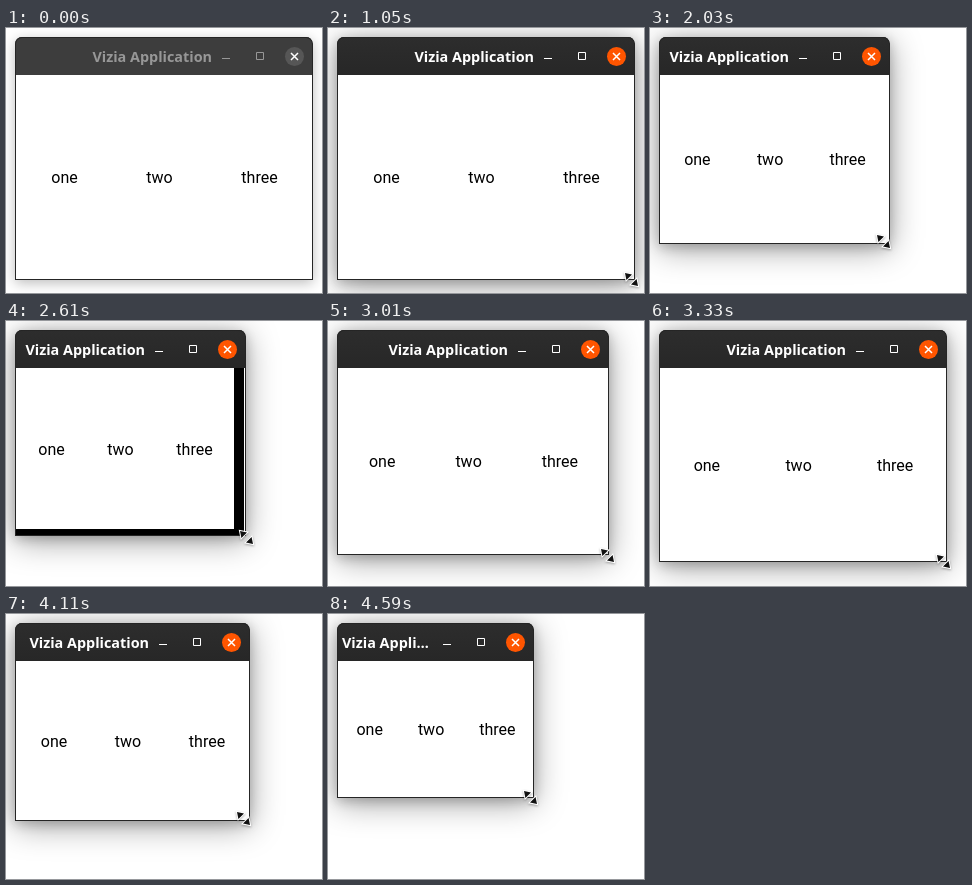
These frames come from a looping animation (316x265 px, 4750 ms). An HTML page:

```html
<!DOCTYPE html>
<html lang="en">
<head>
<meta charset="utf-8">
<title>Resizing a window</title>
<style>
  html, body { margin: 0; width: 100%; height: 100%; overflow: hidden; background: #fff; }
  #win {
    position: absolute; left: 9px; top: 9px; overflow: hidden;
    border-radius: 7px 7px 0 0;
    background: linear-gradient(270deg, #fff 2px, #000 0);
    box-shadow: 0 3px 12px rgba(0, 0, 0, .2), 0 5px 32px rgba(0, 0, 0, .38);
  }
  #win::after {
    content: ""; position: absolute; inset: 0; border-radius: inherit;
    box-shadow: inset 0 0 0 1px #252525;
  }
  #bar {
    position: absolute; inset: 0 0 auto; height: 38px;
    background: linear-gradient(#2d2d2d, #272727); color: #fff;
  }
  #title {
    position: absolute; left: 5px; right: 101px; top: 1px;
    font: 700 14.4px/38px "Noto Sans", "Open Sans", sans-serif;
    text-align: right; white-space: nowrap; overflow: hidden; text-overflow: ellipsis;
  }
  #bar svg { position: absolute; right: 0; top: 0; }
  #bar circle { fill: #ff5500; }
  #body {
    position: absolute; left: 1px; top: 38px; box-sizing: border-box;
    padding: 2px 0 0 1px; background: #fff; color: #000;
    display: flex; justify-content: space-around; align-items: center;
    font: 16px/20px Roboto, sans-serif;
  }
  #win.idle { box-shadow: 0 3px 13px rgba(0, 0, 0, .27); }
  .idle #bar { background: #3d3d3d; color: #979797; }
  .idle #bar circle { fill: #565656; }
  .cursor {
    position: absolute; left: 0; top: 0; overflow: visible;
    filter: drop-shadow(0 1px 1px rgba(0, 0, 0, .3));
  }
  .cursor path { fill: #111; stroke: #fff; stroke-width: 2; paint-order: stroke; }
</style>
</head>
<body>
<div id="win">
  <div id="body"><span>one</span><span>two</span><span>three</span></div>
  <div id="bar">
    <div id="title">Vizia Application</div>
    <svg width="100" height="38" fill="none" stroke="currentColor">
      <path d="M9 21.5h8M43.5 15.5h7v7h-7z"/>
      <circle cx="81.5" cy="19.5" r="9.5" stroke="none"/>
      <path d="M78 16l7 7m0-7l-7 7" stroke="#fff" stroke-width="1.5"/>
    </svg>
  </div>
</div>
<svg class="cursor" id="arrow" width="1" height="1"><path d="M.5.5v13l3-2.7 2 4.6 2.3-1-2-4.4h4z"/></svg>
<svg class="cursor" id="resize" width="1" height="1"><path d="M-6-6l7 1.4-5.6 5.6zM7 7l-7-1.4 5.6-5.6z"/></svg>
<script>
const LOOP = 4750, STEP = 40, FOCUS = 230, ENTER = 520, GRIP = 1000, DRAG = 1550;
const $ = id => document.getElementById(id);
const win = $("win"), content = $("body"), arrow = $("arrow"), resize = $("resize");

// Turning points of the hand: time, x, y
const path = [
  [ENTER, 249, 262], [720, 246, 219], [GRIP, 303, 251],
  [DRAG - STEP, 303, 251], [1670, 266, 232], [2230, 214, 202],
  [2490, 214, 202], [2570, 236, 214], [2970, 277, 233], [3300, 293, 240],
  [3590, 292, 239], [3670, 278, 231], [3710, 268, 224], [4550, 202, 183]
];
const starts = [0, ENTER, DRAG, 2530, 3630];

function pointer(t) {
  const i = path.findIndex(p => p[0] > t);
  if (i < 1) return path.at(i).slice(1);
  const [t0, x0, y0] = path[i - 1], [t1, x1, y1] = path[i];
  const k = (t - t0) / (t1 - t0);
  return [Math.round(x0 + (x1 - x0) * k), Math.round(y0 + (y1 - y0) * k)];
}

// The window trails the pointer by one step.
function corner(t) {
  const [x, y] = pointer(Math.max(t, DRAG) - STEP);
  return [x + 4, y + 1];
}

function size(el, w, h) {
  el.style.width = w + "px";
  el.style.height = h + "px";
}

function draw(time) {
  const start = starts.findLast(s => s <= time);
  const t = start + Math.floor((time - start) / STEP) * STEP;
  const [x, y] = corner(t), last = corner(t - STEP);
  // Fast growth outruns the repaint of the content.
  const [cx, cy] = x - last[0] > 6 ? last : [x, y];
  win.className = time < FOCUS ? "idle" : "";
  size(win, x - 9, y - 9);
  size(content, cx - 11, cy - 48);

  const [px, py] = pointer(t);
  arrow.style.display = t >= ENTER && t < GRIP ? "" : "none";
  resize.style.display = t >= GRIP ? "" : "none";
  arrow.style.transform = resize.style.transform = `translate(${px}px, ${py}px)`;
}

let begin;
function tick(now) {
  begin ??= now;
  draw((now - begin) % LOOP);
  requestAnimationFrame(tick);
}
draw(0);
requestAnimationFrame(tick);
</script>
</body>
</html>
```
